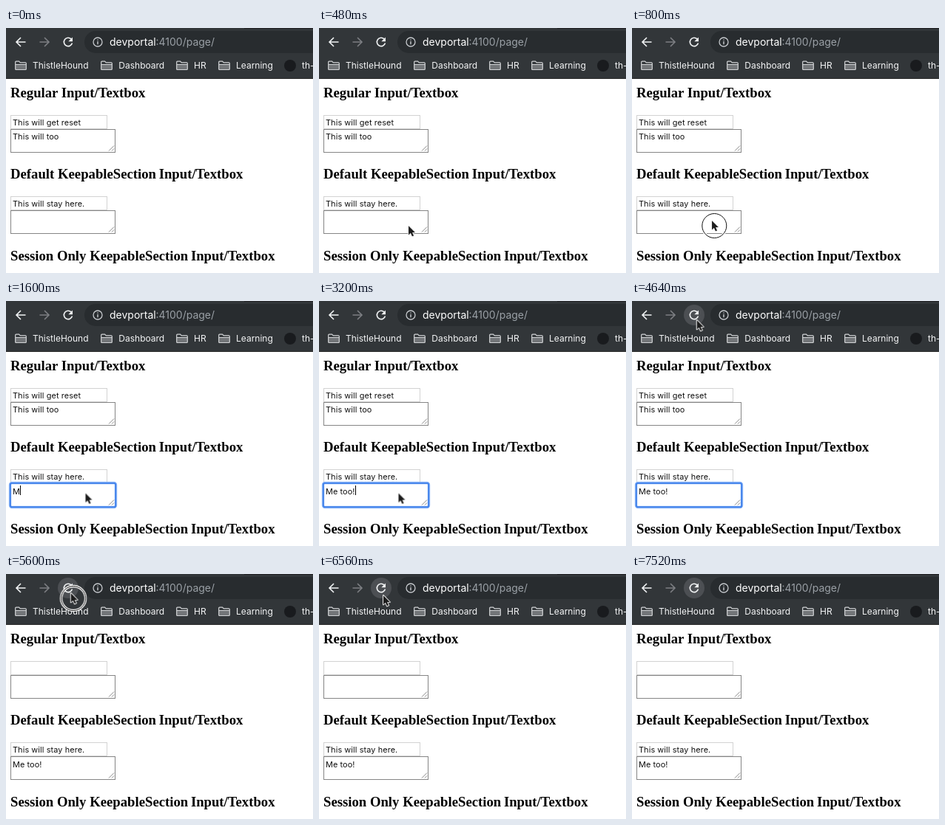
Animation, 415 px wide and 332 px high, one loop 8.32 s. Source, as an HTML page:

```html
<!DOCTYPE html>
<html lang="en">
<head>
<meta charset="utf-8">
<title>Saved form demo</title>
<style>
  html, body { margin: 0; width: 100%; height: 100%; overflow: hidden; background: #fff; }
  svg { display: block; width: 415px; height: 332px; }

  text { white-space: pre; }
  .bar { font: 12px Inter, "Open Sans", sans-serif; fill: #f4f5f6; }
  .url { font: 14px Inter, "Open Sans", sans-serif; fill: #fff; }
  .dim { fill: #9aa0a6; }
  .head { font: bold 18.72px "Liberation Serif", "Noto Serif", serif; }
  .field { font: 10.9px Inter, "Open Sans", sans-serif; letter-spacing: .09px; fill: #111; }
  .icon { fill: none; stroke: #f1f3f4; stroke-width: 1.6; }
  .input { fill: #fff; stroke: #d2d2d2; }
  .area { fill: #fff; stroke: #858585; }
  .grip { fill: none; stroke: #777; stroke-width: .9; }

  /* One tick is 160 ms, 1/52 of the loop. */
  .anim { animation: 8.32s step-end infinite; }
  .hover { animation-name: hover; }
  .lost { animation-name: lost; }
  .focus { animation-name: focus; }
  .typed { animation-name: typed; }
  .caret { animation-name: caret; }
  .pointer { animation-name: pointer; }
  .ring { animation-name: ring; }

  @keyframes hover {
    0% { opacity: 0; }
    53.84%, 100% { opacity: 1; }
  }
  @keyframes lost {
    0% { opacity: 1; }
    61.53%, 100% { opacity: 0; }
  }
  @keyframes focus {
    0% { opacity: 0; }
    11.53% { opacity: 1; }
    61.53%, 100% { opacity: 0; }
  }
  @keyframes typed {
    0% { width: 0; }
    19.23% { width: 13px; }
    23.07% { width: 19.5px; }
    25% { width: 22px; }
    26.92% { width: 26px; }
    30.76% { width: 33px; }
    32.69% { width: 39.7px; }
    38.46%, 100% { width: 46px; }
  }
  @keyframes caret {
    0% { opacity: 0; transform: translateX(9px); }
    13.46% { opacity: 1; transform: translateX(9px); }
    17.3% { opacity: 0; transform: translateX(9px); }
    19.23% { opacity: 1; transform: translateX(19px); }
    23.07% { opacity: 1; transform: translateX(26px); }
    25% { opacity: 1; transform: translateX(29px); }
    26.92% { opacity: 1; transform: translateX(32px); }
    30.76% { opacity: 1; transform: translateX(39px); }
    32.69% { opacity: 1; transform: translateX(45px); }
    38.46% { opacity: 1; transform: translateX(49px); }
    44.23%, 100% { opacity: 0; transform: translateX(49px); }
  }
  @keyframes pointer {
    0% { opacity: 0; transform: translate(205px, 294px); }
    1.92% { opacity: 1; transform: translate(205px, 292px); }
    3.84% { opacity: 1; transform: translate(156px, 284px); }
    5.76% { opacity: 1; transform: translate(121px, 268px); }
    7.69% { opacity: 1; transform: translate(108px, 261px); }
    13.46% { opacity: 1; transform: translate(107.5px, 260.5px); }
    46.15% { opacity: 1; transform: translate(107px, 242px); }
    48.07% { opacity: 1; transform: translate(103px, 172px); }
    50% { opacity: 1; transform: translate(95px, 76px); }
    51.92% { opacity: 1; transform: translate(88px, 10px); }
    53.84% { opacity: 1; transform: translate(87px, 21px); }
    55.76% { opacity: 1; transform: translate(87.7px, 26px); }
    73.07% { opacity: 1; transform: translate(87.5px, 27px); }
    75% { opacity: 1; transform: translate(87px, 29px); }
    80.76% { opacity: 1; transform: translate(87px, 28.5px); }
    88.46% { opacity: 1; transform: translate(114px, 33px); }
    90.38%, 100% { opacity: 0; transform: translate(114px, 33px); }
  }
  @keyframes ring {
    0% { opacity: 0; }
    9.61% { opacity: 1; }
    11.53% { opacity: 0; }
    59.61% { opacity: 1; }
    61.53% { opacity: 0; }
    67.3% { opacity: 1; }
    69.23% { opacity: 0; }
    76.92% { opacity: 1; }
    78.84%, 100% { opacity: 0; }
  }
</style>
</head>
<body>
<svg viewBox="0 0 415 332">
  <defs>
    <g id="folder" fill="none" stroke="#d3d5d7">
      <path fill="#d3d5d7" fill-opacity=".4" stroke="none" d="M1 5H15V12H1Z"/>
      <path stroke-width="1.2" d="M.7 11V1.8Q.7.7 1.8.7H5.6L7.2 2.4H14.2Q15.3 2.4 15.3 3.5V11Q15.3 12 14.2 12H1.8Q.7 12 .7 11ZM.7 5H15.3"/>
    </g>
    <g id="fields">
      <rect class="input" x="6.5" y=".5" width="130" height="18"/>
      <rect class="area" x="6.5" y="19.5" width="141" height="31"/>
      <path class="grip" d="M139 48.5l7-7M143 48.5l3-3"/>
    </g>
    <clipPath id="shown"><rect class="anim typed" x="6" y="248" width="0" height="18"/></clipPath>
  </defs>

  <!-- Toolbar -->
  <rect width="415" height="69" fill="#323639"/>
  <rect y="68" width="415" height="1" fill="#282828"/>
  <rect x="322" width="93" height="1" fill="#202124"/>
  <rect x="106" y="4" width="340" height="30" rx="15" fill="#282c2f"/>
  <circle class="anim hover" cx="84" cy="19" r="14" fill="#4c4f53"/>
  <g class="icon">
    <path d="M26.5 19H14.5M20 13l-6 6 6 6"/>
    <path stroke="#7d7f83" d="M45.5 19H57.5M52 13l6 6-6 6"/>
    <path d="M88.2 15A5.7 5.7 0 1 0 89.5 20.6"/>
  </g>
  <path d="M90 12.5V18.2H84.3Z" fill="#f1f3f4"/>
  <circle cx="124" cy="19" r="6" fill="none" stroke="#c6c9cd" stroke-width="1.3"/>
  <path d="M124 18v4.2M124 15.4v1.4" stroke="#c6c9cd" stroke-width="1.4"/>
  <text class="url" x="140" y="24">devportal</text>
  <text class="url dim" x="202.5" y="24">:4100/page/</text>

  <!-- Bookmarks -->
  <use href="#folder" x="12" y="44.5"/>
  <use href="#folder" x="128" y="44.5"/>
  <use href="#folder" x="230" y="44.5"/>
  <use href="#folder" x="287" y="44.5"/>
  <circle cx="384" cy="51" r="8" fill="#191b1e"/>
  <g class="bar">
    <text x="36" y="55">ThistleHound</text>
    <text x="152.3" y="55">Dashboard</text>
    <text x="254" y="55">HR</text>
    <text x="311" y="55">Learning</text>
    <text x="400" y="55">th-</text>
  </g>

  <!-- Page -->
  <g class="head">
    <text x="6" y="94">Regular Input/Textbox</text>
    <text x="6" y="204">Default <tspan x="70">KeepableSection</tspan><tspan x="206.7">Input/Textbox</tspan></text>
    <text x="6" y="315">Session Only <tspan x="113.2">KeepableSection</tspan><tspan x="249.9">Input/Textbox</tspan></text>
  </g>
  <use href="#fields" y="118"/>
  <use href="#fields" y="228"/>
  <g class="anim focus" fill="none">
    <rect x="5.5" y="246.5" width="143" height="33" rx="2.5" stroke="#8fb8f8" stroke-width="3.4"/>
    <rect x="5.8" y="246.8" width="142.4" height="32.4" rx="2" stroke="#3f80ea" stroke-width="1.8"/>
  </g>
  <g class="field">
    <g class="anim lost">
      <text x="9" y="132">This will get reset</text>
      <text x="9" y="151">This will too</text>
    </g>
    <text x="9" y="242">This will stay here.</text>
    <text x="9" y="261.5" clip-path="url(#shown)">Me too!</text>
  </g>
  <rect class="anim caret" y="250" width="1" height="13"/>

  <!-- Pointer and click ring -->
  <g class="anim pointer">
    <g class="anim ring" fill="none">
      <circle cx="3.3" cy="7" r="16.5" stroke="#fff" stroke-width="3.4"/>
      <circle cx="3.3" cy="7" r="16.5" stroke="#111" stroke-width="1"/>
    </g>
    <path d="M0 0V13L3 10.2 5.1 15 7.4 14 5.3 9.4H9.3Z" fill="#1c1c1c" stroke="#fff" stroke-width="1.8" paint-order="stroke" stroke-linejoin="round" transform="scale(.96)"/>
  </g>
</svg>
</body>
</html>
```
